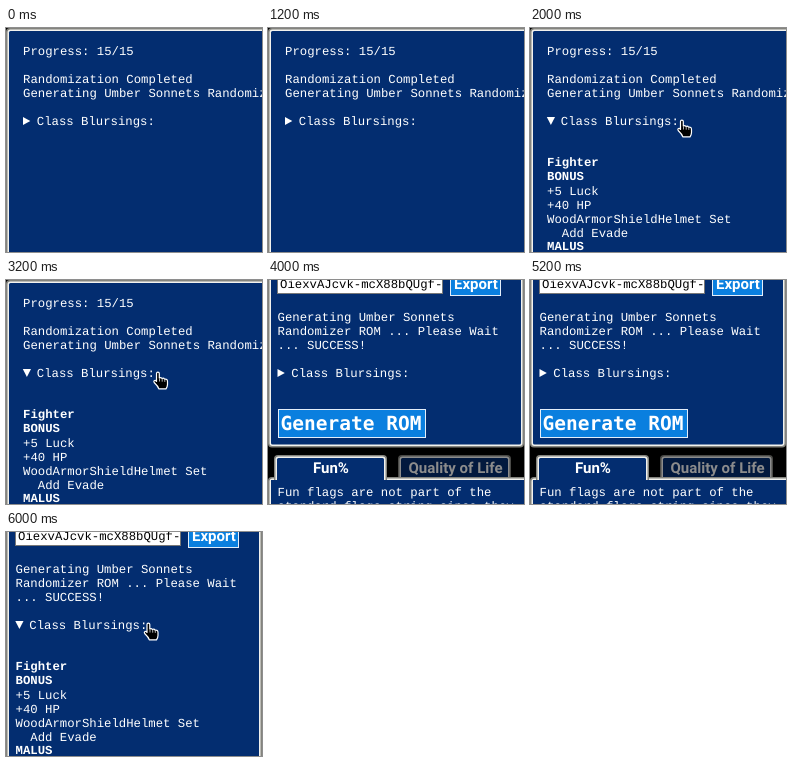
An HTML page for the animation above (8000 ms loop, 256 by 224 pixels).

```html
<!DOCTYPE html>
<html lang="en">
<head>
<meta charset="utf-8">
<title>Class Blursings</title>
<style>
  html, body { margin: 0; width: 100%; height: 100%; overflow: hidden; background: #000; }
  svg { display: block; width: 256px; height: 224px; }
  text { font: 12.3px "Liberation Mono", monospace; fill: #fff; white-space: pre; text-rendering: geometricPrecision; }
  .b { font-weight: bold; }
  .ink { fill: #000; }
  .head { font: bold 15px Roboto, sans-serif; }
  .big { font: bold 19.5px "DejaVu Sans Mono", monospace; }
  .dim { fill: #8c8c8c; }
</style>
</head>
<body>
<svg id="stage" viewBox="0 0 256 224"></svg>
<script>
const STEP = 2000;
const NAVY = '#032d70', BLUE = '#0a7fdf', EDGE = '#f2f2ee', GRAY = '#84847e';

const text = (x, y, s, cls = '') => `<text x="${x}" y="${y}" class="${cls}">${s}</text>`;
const lines = (x, y, list, cls) => list.map((s, i) => text(x, y + i * 14, s, cls)).join('');
const rect = (x, y, w, h, fill, extra = '') =>
  `<rect x="${x}" y="${y}" width="${w}" height="${h}" fill="${fill}" ${extra}/>`;
const path = (d, fill, extra = '') => `<path d="${d}" fill="${fill}" ${extra}/>`;

// Filled box with a grey outer line and a light inner border
const panel = (x, y, w, h, edge = EDGE, fill = NAVY, outer = GRAY) =>
  rect(x, y, w, h, outer, 'rx="4"') +
  rect(x + 1.5, y + 1.5, w - 3, h - 3, edge, 'rx="3"') +
  rect(x + 3, y + 3, w - 6, h - 6, fill, 'rx="1.5"');

const button = (x, y, w, h) =>
  rect(x + .5, y + .5, w - 1, h - 1, BLUE, 'stroke="#e4eefa"');

const summary = (x, open) =>
  path(open ? `M${x - .2} 89h8.200l-4.100 8z` : `M${x} 89l7.300 4l-7.300 4z`, '#fff') +
  text(x + 13.8, 97, 'Class Blursings:');

const details = x =>
  lines(x, 138, ['Fighter', 'BONUS'], 'b') +
  lines(x, 167, ['+5 Luck', '+40 HP', 'WoodArmorShieldHelmet Set', '  Add Evade']) +
  text(x, 222, 'MALUS', 'b');

const hand = (x, y) => `<g transform="translate(${x} ${y})">` +
  path('M3.500 2Q3.500 .7 4.900 .7T6.300 2V6.500Q7.800 5.500 9 7Q10.600 6.100 11.600 7.700Q14.500 7.200 14.500 10V13Q14.500 15 13 17.300H5.800Q4.900 14.600 1.400 11.300Q.2 9.600 1.600 9Q2.600 8.700 3.500 9.900Z',
    '#000', 'stroke="#fff" stroke-width="1.200" stroke-linejoin="round"') +
  path('M6.500 7v3M9.200 7.500v2.700M11.800 8.200v2.200', 'none', 'stroke="#fff" stroke-width=".7"') + '</g>';

const progress = open =>
  panel(0, 0, 270, 240) +
  text(17, 27, 'Progress: 15/15') +
  lines(17, 55, ['Randomization Completed', 'Generating Umber Sonnets Randomizer']) +
  summary(17, open);

const result = (open, height) =>
  panel(0, -20, 256, height + 20) +
  rect(9.5, -8, 165, 21.5, '#fff', 'stroke="#777"') +
  text(12, 8, 'OiexvAJcvk-mcX88bQUgf-', 'ink') +
  button(182, -10, 51, 26) +
  text(186, 9, 'Export', 'head') +
  lines(9.5, 41, ['Generating Umber Sonnets', 'Randomizer ROM ... Please Wait', '... SUCCESS!']) +
  summary(9.5, open);

const tabs = () =>
  panel(130, 175, 113, 40, '#8c8c8c', '#02193e', '#4a4a47') +
  panel(0, 197, 260, 50) +
  panel(6, 175, 113, 40) +
  rect(3, 200, 253, 24, NAVY) +
  text(45, 193, 'Fun%', 'head') +
  text(140.5, 193, 'Quality of Life', 'head dim') +
  lines(9.5, 216, ['Fun flags are not part of the', 'standard flags string since they']);

const scenes = [
  progress(false),
  progress(true) + details(17) + hand(147, 91.5),
  result(false, 167.5) + button(10, 129, 148, 29) + text(12.5, 150, 'Generate ROM', 'big') + tabs(),
  result(true, 240) + details(9.5) + hand(137.5, 90.5)
];

const stage = document.getElementById('stage');
stage.innerHTML = scenes.map(s => `<g display="none">${s}</g>`).join('');
const groups = [...stage.children];
const start = performance.now();
let shown = -1;

function draw(now) {
  const k = Math.floor(Math.max(0, now - start) / STEP) % scenes.length;
  if (k !== shown) {
    groups.forEach((g, i) => g.setAttribute('display', i === k ? 'inline' : 'none'));
    shown = k;
  }
  requestAnimationFrame(draw);
}
draw(start);
</script>
</body>
</html>
```
